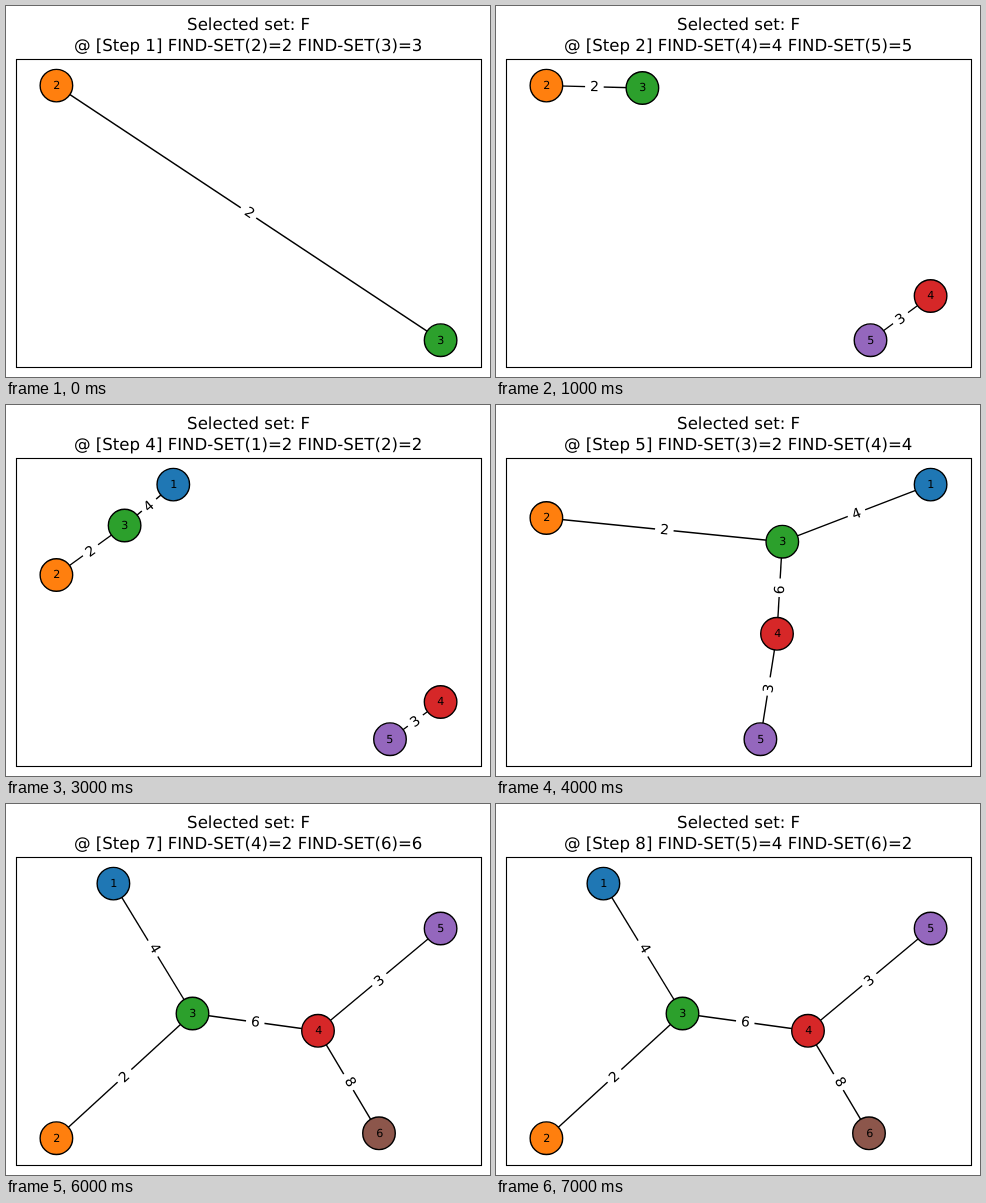
Recreate the animation shown at these times as an HTML page. Size 484 by 371 pixels, loop 8000 ms.

```html
<!DOCTYPE html>
<html lang="en">
<head>
<meta charset="utf-8">
<title>Spanning tree steps</title>
<style>
html, body { margin: 0; width: 100%; height: 100%; overflow: hidden; background: #fff; }
svg { display: block; width: 484px; height: 371px; }
text { font-family: "DejaVu Sans", sans-serif; text-anchor: middle; text-rendering: geometricPrecision; }
.title { font-size: 16.6px; }
.node { font-size: 11.11px; }
.weight { font-size: 13.89px; }
circle, line { stroke: #000; stroke-width: 1.39; }
</style>
</head>
<body>
<svg viewBox="0 0 484 371">
  <rect width="484" height="371" fill="#fff"/>
  <g id="graph"></g>
  <rect x="10.5" y="53.5" width="465" height="308" fill="none" stroke="#000" stroke-width="1.11"/>
  <text class="title" x="242.6" y="24">Selected set: F</text>
  <text class="title" x="242.2" y="45" id="step"></text>
</svg>
<script>
const STEP_MS = 1000;
const L = 50.4, R = 434.6, T = 79.6, B = 334.2;
const colors = ['#1f77b4', '#ff7f0e', '#2ca02c', '#d62728', '#9467bd', '#8c564b'];

// Candidate edges by rising weight; the lightest weighs 2
const candidates = ['23', '45', '13', '12', '34', '24', '46', '56'];

// The separate 4-5 pair sits in the lower right corner
const pair = s => ({ 4: [R, B - 44.2 * s], 5: [R - 60.1 * s, B] });

// Node places for each size of the tree; the outermost nodes touch the L, R, T, B bounds
const layouts = [
  { 2: [L, T], 3: [R, B] },
  { 2: [L, T], 3: [146.4, 82], ...pair(1) },
  { 1: [167.3, T], 2: [L, 170], 3: [118.6, 120.5], ...pair(0.842) },
  { 1: [R, T], 2: [L, 113], 3: [286.3, 136.7], 4: [281, 228.8], 5: [264.4, B] },
  { 1: [107.4, T], 2: [L, B], 3: [186.5, 209.5], 4: [312, 226.8], 5: [R, 124.5], 6: [373, 329.3] }
];

// Kruskal's algorithm with union by rank; the caption shows each node's parent
function kruskal() {
  const parent = [0, 1, 2, 3, 4, 5, 6];
  const rank = parent.map(() => 0);
  const root = n => parent[n] === n ? n : root(parent[n]);
  let tree = [];
  return candidates.map(([u, v], i) => {
    const caption = `@ [Step ${i + 1}] FIND-SET(${u})=${parent[u]} FIND-SET(${v})=${parent[v]}`;
    let a = root(+u), b = root(+v);
    if (a !== b) {
      if (rank[a] < rank[b]) [a, b] = [b, a];
      if (rank[a] === rank[b]) rank[a]++;
      parent[b] = a;
      tree = [...tree, [u, v, i + 2]];
    }
    return { caption, tree };
  });
}

const steps = kruskal();
const graph = document.getElementById('graph');
const title = document.getElementById('step');

const line = ([x1, y1], [x2, y2]) =>
  `<line x1="${x1}" y1="${y1}" x2="${x2}" y2="${y2}"/>`;

// White gap in the line, and the digit turned along it, upright side up
function weight([x1, y1], [x2, y2], w) {
  const x = (x1 + x2) / 2, y = (y1 + y2) / 2;
  const a = Math.atan((y2 - y1) / (x2 - x1));
  const turn = `rotate(${a * 180 / Math.PI})`;
  const drift = 2 * Math.sin(a);
  return `<rect x="-9.3" y="-11.5" width="18.6" height="23" rx="4" fill="#fff"
      transform="translate(${x} ${y}) ${turn}"/>
    <text class="weight" y="4.3"
      transform="translate(${x + Math.max(0, drift)} ${y + Math.max(0, -drift)}) ${turn}">${w}</text>`;
}

const node = (id, [x, y]) =>
  `<circle cx="${x}" cy="${y}" r="16.28" fill="${colors[id - 1]}"/>
   <text class="node" x="${Math.round(x - 3.5) + 3.9}" y="${Math.round(y + 3.3)}">${id}</text>`;

function draw({ caption, tree }) {
  const pos = layouts[tree.length - 1];
  graph.innerHTML =
    tree.map(([u, v]) => line(pos[u], pos[v])).join('') +
    tree.map(([u, v, w]) => weight(pos[u], pos[v], w)).join('') +
    Object.keys(pos).map(id => node(id, pos[id])).join('');
  title.textContent = caption;
}

let current = 0;
const start = performance.now();

function tick(now) {
  const i = Math.floor(Math.max(0, now - start) / STEP_MS) % steps.length;
  if (i !== current) draw(steps[current = i]);
  requestAnimationFrame(tick);
}

draw(steps[0]);
requestAnimationFrame(tick);
</script>
</body>
</html>
```
